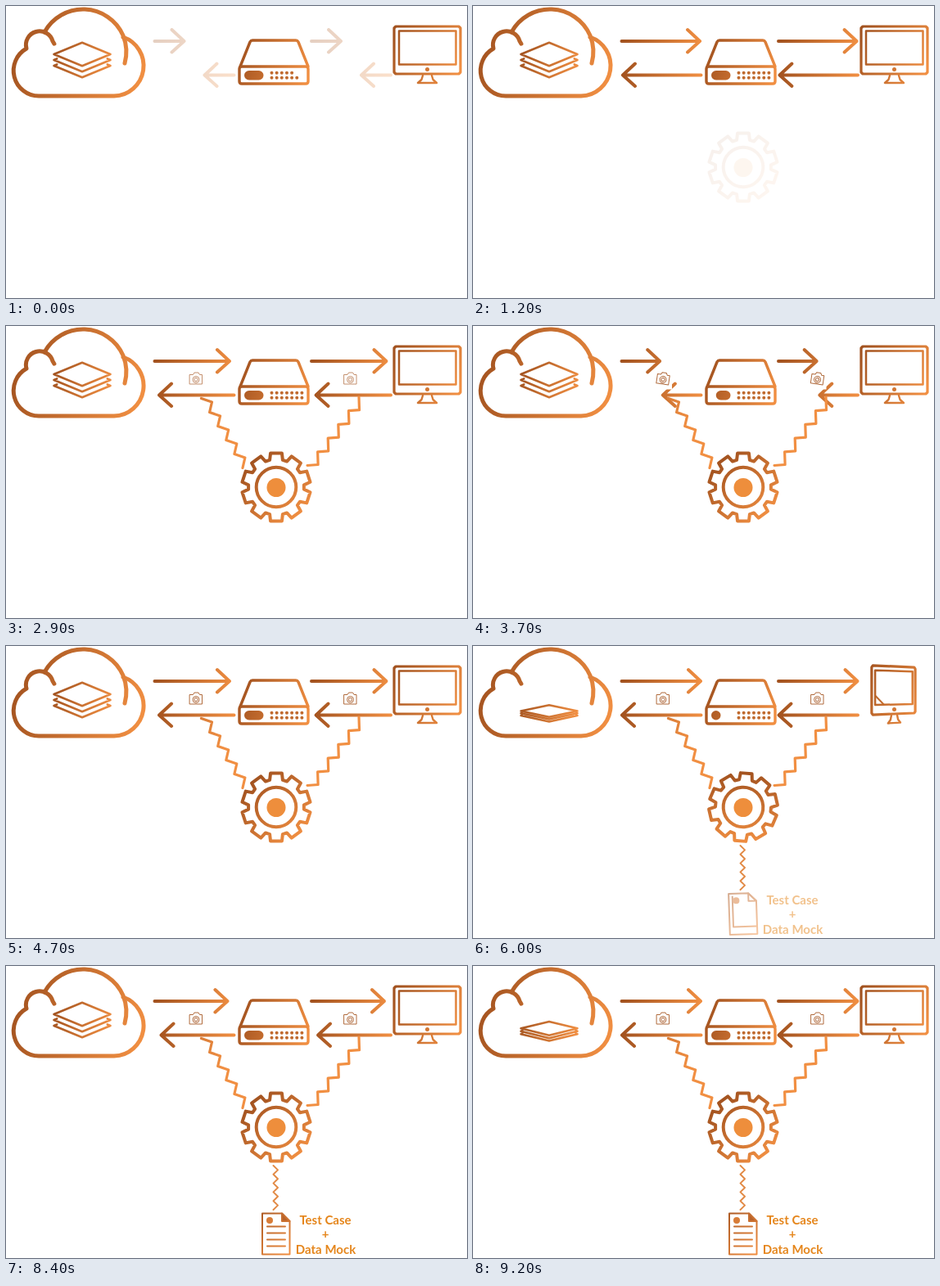
Animation, 563 px wide and 357 px high, one loop 9.3 s. Source, as an HTML page:

```html
<!DOCTYPE html>
<html lang="en">
<head>
<meta charset="utf-8">
<title>Request capture flow</title>
<style>
  html, body { margin: 0; width: 100%; height: 100%; overflow: hidden; background: #fff; }
  svg { display: block; width: 563px; height: 357px; }
  path, circle.ring { fill: none; stroke-linecap: round; stroke-linejoin: round; }
  text { font: 700 15px Lato, "Open Sans", sans-serif; fill: #e5861c; text-anchor: middle; }
</style>
</head>
<body>
<svg viewBox="0 0 563 357" xmlns="http://www.w3.org/2000/svg">
  <defs id="defs"></defs>

  <g id="cloud" stroke="url(#gCloud)" stroke-width="5">
    <path id="cloudBody" pathLength="100"
      d="M79 80L57 43A16 16 0 0 0 25 52A31 31 0 0 0 40 110H132A37 37 0 0 0 143 38"/>
    <path id="cloudTop" pathLength="100" d="M47 32A53.5 53.5 0 0 1 143 36A53.5 53.5 0 0 1 145 70"/>
  </g>
  <path id="stack" stroke="url(#gStack)" stroke-width="2.6"/>

  <g id="arrows" stroke-width="4"></g>

  <g stroke="url(#gServer)" stroke-width="3.4">
    <path d="M286 74L298 44Q299 42 301 42H354Q356 42 357 44L369 74"/>
    <path d="M288 74H366Q369 74 369 77V92Q369 95 366 95H288Q285 95 285 92V77Q285 74 288 74Z"/>
  </g>
  <rect id="pill" y="79" height="11.5" rx="5.75" fill="url(#gServer)"/>
  <g id="dots" fill="#c06a2e"></g>

  <g stroke="url(#gMonitor)">
    <path id="frame" stroke-width="3.2"/>
    <path id="screen" stroke-width="2.5"/>
    <path id="stand" stroke-width="2.4"/>
    <path id="glare" stroke-width="2"/>
    <path id="button" stroke-width="5"/>
  </g>

  <g stroke="url(#gLink)" stroke-width="3.2">
    <path id="linkL" pathLength="100"/>
    <path id="linkR" pathLength="100"/>
  </g>
  <g id="cams"></g>

  <g id="gear">
    <g id="gearSpin" stroke="url(#gGear)" stroke-width="4">
      <path id="teeth"/>
      <circle class="ring" cx="330" cy="197" r="24.3"/>
    </g>
    <circle cx="330" cy="197.5" r="11.5" fill="#ee8e3c"/>
  </g>

  <path id="linkDoc" pathLength="100" stroke="#e28a45" stroke-width="1.9"/>
  <g id="doc">
    <g id="page" stroke="url(#gDoc)" stroke-width="2">
      <path d="M313 302.5H337L346.5 312V352.5H313Z"/>
      <path id="fold" d="M337 302.5V312H346.5Z" style="fill:#b8632b"/>
      <path id="inner" d="M317.5 306V343H346"/>
      <path id="lines" pathLength="100" d="M319 318.5H341M319 326.5H341M319 334.5H341M319 342.5H341"/>
      <circle cx="322" cy="311" r="4" fill="#d87c37" stroke="none"/>
    </g>
    <text x="390" y="316">Test Case</text>
    <text x="390" y="333">+</text>
    <text x="390.5" y="352">Data Mock</text>
  </g>
</svg>
<script>
const LOOP = 9300, STEP = 100, CYCLE = 3800;
const DARK = '#a2521f', LIGHT = '#f18f42';
const $ = id => document.getElementById(id);
const set = (el, attrs) => { for (const k in attrs) el.setAttribute(k, attrs[k]); };
const fade = (id, opacity) => { $(id).style.opacity = opacity; };

const clamp = p => Math.max(0, Math.min(1, p));
const smooth = p => { p = clamp(p); return p * p * (3 - 2 * p); };
const ease = (t, from, span) => smooth((t - from) / span);
const pulse = (t, mid, half) => smooth(1 - Math.abs(t - mid) / half);
const sum = (list, f) => list.reduce((s, v) => s + f(v), 0);
const rad = deg => deg * Math.PI / 180;
const poly = pts => 'M' + pts.map(p => p.map(n => n.toFixed(2)).join(' ')).join('L');

function add(parent, tag, attrs = {}) {
  const el = document.createElementNS('http://www.w3.org/2000/svg', tag);
  set(el, attrs);
  parent.appendChild(el);
  return el;
}

function gradient(id, x1, y1, x2, y2) {
  const g = add($('defs'), 'linearGradient', { id, x1, y1, x2, y2, gradientUnits: 'userSpaceOnUse' });
  add(g, 'stop', { offset: 0, 'stop-color': DARK });
  add(g, 'stop', { offset: 1, 'stop-color': LIGHT });
  return g;
}

// Zigzag made of two alternating strides.
function stairs(x, y, a, b, count) {
  const pts = [[x, y]];
  for (let i = 0; i < count; i++) {
    const [dx, dy] = i % 2 ? b : a;
    pts.push([x += dx, y += dy]);
  }
  return poly(pts);
}

function gearPath(cx, cy, n, outer, root) {
  const pts = [];
  const at = (deg, r) => pts.push([cx + r * Math.cos(rad(deg)), cy + r * Math.sin(rad(deg))]);
  for (let i = 0; i < n; i++) {
    const c = -90 + i * 360 / n;
    at(c - 13.5, root); at(c - 9.5, outer); at(c + 9.5, outer); at(c + 13.5, root);
  }
  return poly(pts) + 'Z';
}

const cloudGrad = gradient('gCloud', 8, 40, 168, 85);
gradient('gStack', 58, 55, 128, 80);
gradient('gServer', 285, 55, 370, 85);
gradient('gMonitor', 474, 35, 556, 75);
gradient('gLink', 130, 60, 262, 130);
gradient('gGear', 300, 165, 362, 230);
gradient('gDoc', 300, 300, 350, 350);

const arrows = [181.5, 373].flatMap((x, i) => {
  gradient('gArrow' + i, x, 0, x + 98, 0);
  return [1, -1].map(dir => ({
    dir, x: dir > 0 ? x : x + 97, y: dir > 0 ? 43 : 84.5,
    el: add($('arrows'), 'path', { stroke: `url(#gArrow${i})` })
  }));
});

const dots = [];
for (let row = 0; row < 2; row++)
  for (let col = 0; col < 7; col++)
    dots.push({ row, col, el: add($('dots'), 'circle', { cx: 324.5 + col * 6.15, cy: 81.8 + row * 6, r: 2 }) });

const cams = [232, 420.5].map(cx => {
  const g = add($('cams'), 'g');
  add(g, 'rect', { x: cx - 9, y: 55, width: 20, height: 22.5, fill: '#fff' });
  const body = add(g, 'g', { stroke: '#b06a3c', 'stroke-width': 1, fill: 'none' });
  add(body, 'path', { d: `M${cx - 7.5} 59.5h4l1.5-2.5h5l1.5 2.5h3v11.5h-15z` });
  for (const r of [4, 2.1]) add(body, 'circle', { cx, cy: 65.5, r });
  return { cx, body };
});

set($('linkL'), { d: stairs(238.5, 88.5, [13, 4.5], [-2.9, 12.5], 10) });
set($('linkR'), { d: stairs(431, 87, [.5, 15.7], [-13.1, 1], 10) });
set($('linkDoc'), { d: stairs(326.5, 244, [5.5, 5.4], [-5.5, 5.4], 10) });
set($('teeth'), { d: gearPath(330, 197, 10, 42, 34) });

function drawCloud(t) {
  const k = pulse(t, 2100, 500);
  const hide = 10.6 * (1 - k);
  set($('cloud'), { transform: `translate(${3 * k} 0)` });
  set($('cloudBody'), { 'stroke-dasharray': `${100 - hide} 200`, 'stroke-dashoffset': -hide });
  set($('cloudTop'), { 'stroke-dasharray': `${100 - 22 * k} 200` });
  set(cloudGrad, { x1: 8 + 160 * k, x2: 168 - 160 * k, y1: 40 + 45 * k, y2: 85 - 45 * k });
}

// The layers squash down, then spring up before settling.
function drawStack(t) {
  const hops = [1700, 6000, LOOP];
  const squash = sum(hops, c => pulse(t, c, 400));
  const spring = sum(hops, c => pulse(t, c + 400, 300));
  const mid = 59 + 20.5 * squash - 4.5 * spring;
  const half = 14.3 - 7 * squash + spring;
  const gap = 7 - 4.2 * squash;
  const cut = gap * .22;
  let d = poly([[58.5, mid], [93, mid - half], [127.5, mid], [93, mid + half]]) + 'Z';
  for (const y of [mid + gap, mid + gap * 2])
    d += poly([[58.5 + cut * 2.4, y - cut], [58.5, y], [93, y + half], [127.5, y], [127.5 - cut * 2.4, y - cut]]);
  set($('stack'), { d });
}

function drawArrows(t) {
  const p = t % CYCLE;
  const u = clamp(Math.min(p, CYCLE - p) / 1600);
  const len = 36 + 60.5 * (1 - (1 - u) ** 3);
  for (const { dir, x, y, el } of arrows) {
    const tip = x + dir * len, back = tip - dir * 15;
    set(el, { d: `M${x} ${y}H${tip}M${back} ${y - 14}L${tip} ${y}L${back} ${y + 13.5}` });
  }
  fade('arrows', .27 + .73 * ease(t, 0, 600));
}

function drawServer(t) {
  const left = 291 + 11.5 * pulse(t, 3450, 500);
  const right = 314.5 - 12 * sum([2100, 6000, 7250], c => pulse(t, c, 500));
  set($('pill'), { x: left, width: right - left });
  const lit = 8 - 3 * (pulse(t, 0, 400) + pulse(t, 7500, 500));
  const lead = t < LOOP / 2 ? 1 : 0;
  for (const { row, col, el } of dots)
    el.style.opacity = col < lit - (row === lead ? -.8 : .1) ? 1 : 0;
}

function drawMonitor(t) {
  const a = rad(49 * pulse(t, 6000, 500));
  const cx = 514.5, cy = 55, depth = 800;
  const turn = pts => poly(pts.map(([x, y]) => {
    const s = depth / (depth + (x - cx) * Math.sin(a));
    return [cx + (x - cx) * Math.cos(a) * s, cy + (y - cy) * s];
  }));
  const box = (l, t, r, b, c) => turn([[l + c, t], [r - c, t], [r, t + c], [r, b - c],
    [r - c, b], [l + c, b], [l, b - c], [l, t + c]]) + 'Z';
  set($('frame'), { d: box(474, 25, 555, 83, 2) });
  set($('screen'), { d: box(480, 30.5, 549.5, 71.5, 0) });
  set($('stand'), { d: turn([[509, 85], [507.5, 90], [503, 94], [526, 94], [521.5, 90], [520, 85]]) });
  set($('glare'), { d: turn([[481, 61], [495, 71]]) });
  fade('glare', a > .1 ? 1 : 0);
  set($('button'), { d: turn([[cx, 77.5], [cx + .01, 77.5]]) });
}

function reveal(id, p) {
  set($(id), { 'stroke-dasharray': `${100 * p} 200` });
  $(id).style.visibility = p > 0 ? 'visible' : 'hidden';
}

function drawGear(t) {
  fade('gear', ease(t, 1100, 600));
  const turns = sum([1600, 5800], c => ease(t, c, 950));
  set($('gearSpin'), { transform: `rotate(${360 * turns} 330 197)` });
}

function drawLinks(t) {
  const p = ease(t, 2200, 700);
  reveal('linkL', p);
  reveal('linkR', p);
  fade('cams', ease(t, 2500, 600));
  const w = clamp((t - 3200) % CYCLE / 1100);
  const tilt = 20 * (1 - w) * Math.sin(5 * Math.PI * w);
  for (const { cx, body } of cams) set(body, { transform: `rotate(${tilt} ${cx} 65.5)` });
}

function drawDoc(t) {
  reveal('linkDoc', ease(t, 5100, 700));
  const p = ease(t, 5600, 800), ready = ease(t, 6000, 500);
  fade('doc', p);
  set($('page'), { transform: `rotate(${-4 * (1 - p)} 330 328)` });
  fade('inner', 1 - ready);
  $('fold').style.fillOpacity = ready;
  reveal('lines', ease(t, 6100, 800));
}

const parts = [drawCloud, drawStack, drawArrows, drawServer, drawMonitor, drawGear, drawLinks, drawDoc];
const start = performance.now();

function render(now) {
  const t = Math.floor(Math.max(0, now - start) % LOOP / STEP) * STEP;
  for (const draw of parts) draw(t);
  requestAnimationFrame(render);
}
render(start);
</script>
</body>
</html>
```
